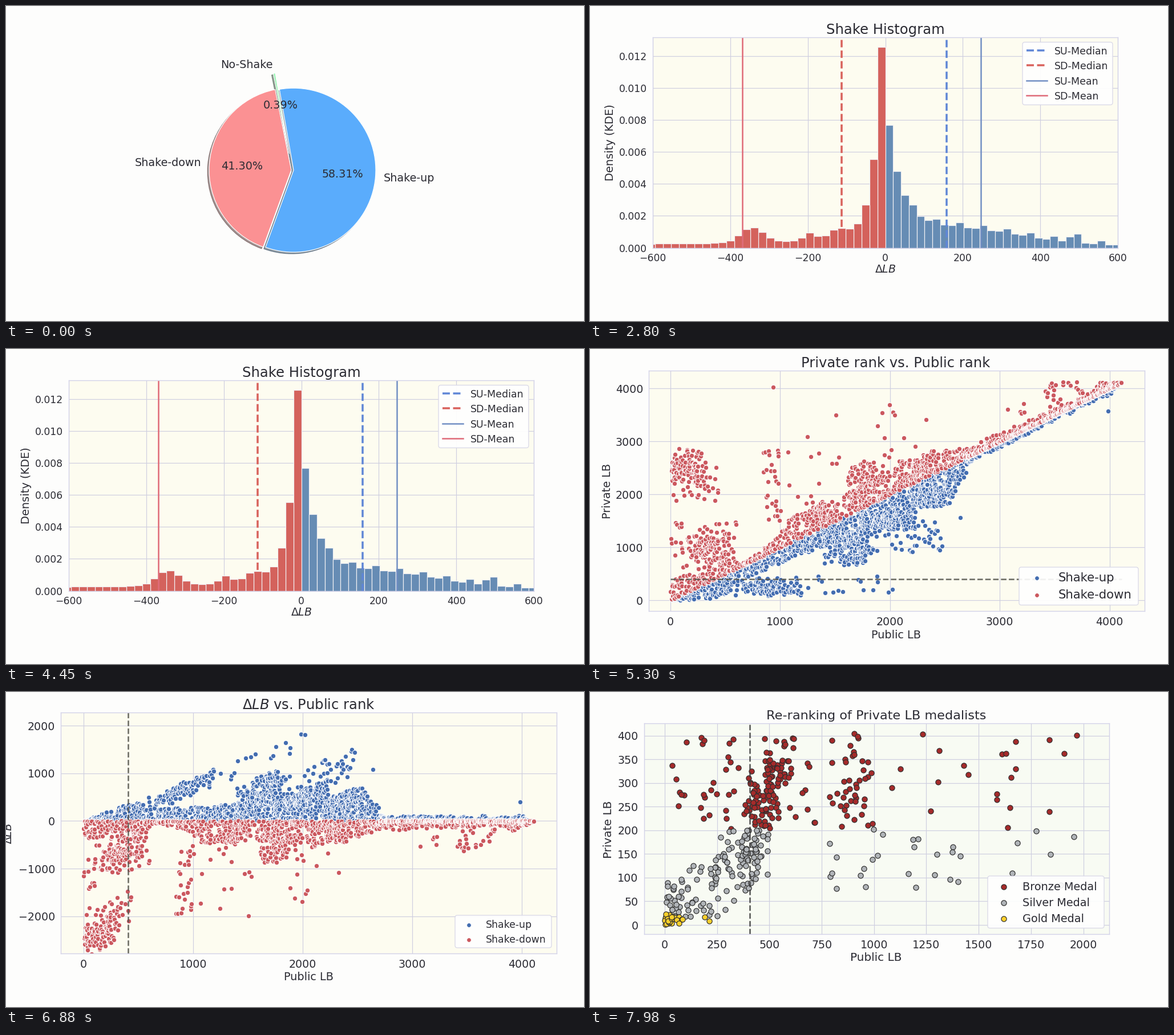
Animation, 1013 px wide and 553 px high, one loop 8 s. Source, as a matplotlib script:

```python
import numpy as np
import matplotlib.pyplot as plt
from matplotlib.animation import FuncAnimation
from matplotlib.patches import FancyBboxPatch, Rectangle

W, H, DPI = 1013, 553, 64
STEP, LOOP = 50, 8000
CUTS = [1650, 2700, 4800, 5850, 6900]   # ms at which the next chart appears

PAPER, INK = "#fdfdfc", "#2b2b33"
GRID = "#cfcfe0"
BLUE, RED = "#436db0", "#cb585e"

plt.rcParams["font.family"] = "DejaVu Sans"
plt.rcParams["text.color"] = INK
rng = np.random.default_rng(7)
fig = plt.figure(figsize=(W / DPI, H / DPI), dpi=DPI, facecolor=PAPER)


def px(n):
    """Pixels to points."""
    return n * 72 / DPI


def pane():
    """Transparent layer over the stage, in pixels from the top left."""
    ax = fig.add_axes([0, 0, 1, 1], zorder=5)
    ax.set(xlim=(0, W), ylim=(H, 0))
    ax.axis("off")
    return ax


def chart(box, xlim, ylim, xticks, yticks, size=19, face="#fdfcf0",
          edge="#d3d2e8", fmt="{:.0f}"):
    x0, y0, x1, y1 = box
    ax = fig.add_axes([x0 / W, 1 - y1 / H, (x1 - x0) / W, (y1 - y0) / H],
                      facecolor=face)
    ax.set(xlim=xlim, ylim=ylim)
    minus = lambda s: s.replace("-", "\u2212")
    ax.set_xticks(xticks, [minus(f"{v:.0f}") for v in xticks])
    ax.set_yticks(yticks, [minus(fmt.format(v)) for v in yticks])
    ax.tick_params(length=0, pad=px(10), labelsize=px(size), labelcolor=INK)
    ax.grid(color=GRID, lw=px(1.2))
    ax.set_axisbelow(True)
    for spine in ax.spines.values():
        spine.set(color=edge, lw=px(1.4))
    return ax


def words(ax, title, xlabel, ylabel):
    """Each argument is (text, x, y, size)."""
    for (s, x, y, size), rot, va in ((title, 0, "baseline"),
                                     (xlabel, 0, "center"),
                                     (ylabel, 90, "center")):
        ax.text(x, y, s, fontsize=px(size), rotation=rot, ha="center", va=va)


def legend_box(ax, x0, y0, x1, y1):
    ax.add_patch(FancyBboxPatch(
        (x0 + 4, y0 + 4), x1 - x0 - 8, y1 - y0 - 8,
        boxstyle="round,pad=4", fc="white", ec="#d6d5e6", alpha=0.9,
        lw=px(1.3)))


def entry(ax, x, y, label, size):
    ax.text(x, y, label, fontsize=px(size), va="center_baseline")


def dots(ax, pts, color, size=8.4, edge="white", ew=1.0):
    x, y = np.asarray(pts).T
    ax.plot(x, y, "o", ms=px(size), mfc=color, mec=edge, mew=px(ew))


def pie_scene():
    ax = pane()
    ax.pie([58.31, 0.39, 41.30], labels=["Shake-up", "No-Shake", "Shake-down"],
           explode=(2, 29, 2), startangle=-110, radius=144,
           colors=["#5aacfc", "#98f4b2", "#fb9193"], autopct="%.2f%%",
           shadow={"ox": -3.2, "oy": -3.2},
           wedgeprops={"edgecolor": "white", "linewidth": px(1.2)},
           textprops={"fontsize": px(19.1), "color": INK})
    ax.set(xlim=(-502, W - 502), ylim=(288 - H, 288))
    return [ax]


def count_scene():
    ax = chart((115, 94, 930, 410.5), (-500, 500), (0, 1431),
               range(-400, 401, 200), range(0, 1401, 200), 17.3,
               face="#fdfbdc", edge=INK)
    bins = [61, 151, 111, 120, 256, 1359, 441, 337, 269, 156, 124]
    ax.bar(-536.5 + 98.4 * np.arange(11), bins, 98.4, align="edge",
           color="#6db580", ec="#ebeaf0", lw=px(2.6))
    ax.axvline(-8.6, color="#1c1c1c", ls="--", lw=px(3.6))
    ax.axvline(20.5, color="#1c1c1c", lw=px(2.6))
    top = pane()
    words(top, ("Shake Histogram ( bin-width = 81 places )", 521.5, 87, 19),
          (r"$\Delta LB$", 522, 449.5, 19), ("Frequency", 47, 254, 19))
    legend_box(top, 793, 102, 921, 187)
    top.plot([800, 836], [117, 117], "--", color="#1c1c1c", lw=px(3.6))
    top.plot([800, 836], [143, 143], color="#1c1c1c", lw=px(2.6))
    top.add_patch(Rectangle((801, 163), 33, 12, fc="#6db580", ec="#ebeaf0",
                            lw=px(2)))
    for y, s in ((117, "Mean"), (143, "Median"), (169, "Shake")):
        entry(top, 849, y, s, 17.3)
    return [ax, top]


def density_scene():
    ax = chart((110, 55, 925, 424.5), (-600, 600), (0, 0.01317),
               range(-600, 601, 200), np.arange(0, 0.0121, 0.002), 17.3,
               fmt="{:.3f}")
    # Sharp peak at zero with a lumpy tail on each side, in units of 1e-5
    k = np.arange(30)
    bump = lambda at, width: np.exp(-((k - at) / width) ** 2)
    down = (1165 * np.exp(-k / 1.1) + 70 * np.exp(-k / 9) + 22
            + 95 * bump(16.3, 2) + 45 * bump(9, 1) + 55 * bump(5.5, 1.5))
    up = 600 * np.exp(-k / 1.7) + 20 + 135 / (1 + np.exp((k - 17) / 4))
    up += 16 * np.cos(2.1 * k) + 40 * bump(23.5, 1)
    for heights, w, color in ((down, -20.5, "#d4625c"), (up, 20.25, "#668cb4")):
        ax.bar(w * k, heights * 1e-5, w, align="edge", color=color,
               ec="#f2f1f4", lw=px(1.2))
    lines = [(159, "SU-Median", "#5f86d6", "--", 3.5),
             (-112.5, "SD-Median", "#d9625c", "--", 3.5),
             (246, "SU-Mean", "#728fc4", "-", 2.5),
             (-369, "SD-Mean", "#df6a78", "-", 2.5)]
    top = pane()
    words(top, ("Shake Histogram", 517.5, 48.5, 24.2),
          (r"$\Delta LB$", 517.5, 463, 19), ("Density (KDE)", 36, 240, 19.4))
    legend_box(top, 758, 63.5, 916, 173.5)
    for i, (x, label, color, ls, lw) in enumerate(lines):
        y = 78 + 26.3 * i
        ax.axvline(x, color=color, ls=ls, lw=px(lw))
        top.plot([765, 801], [y, y], color=color, ls=ls, lw=px(lw))
        entry(top, 814, y, label, 17.4)
    return [ax, top]


def patch(n, x0, x1, y0, y1, tight=1.7):
    """n points scattered over a box, denser in its middle."""
    u = rng.beta(tight, tight, (n, 2))
    return np.array([x0, y0]) + u * [x1 - x0, y1 - y0]


def fan(n, side, skew, keys):
    """Points off the diagonal, within a reach given by (x, reach) keys."""
    kx, reach = np.transpose(keys)
    x = rng.uniform(kx[0], kx[-1], n)
    return np.c_[x, x + side * np.interp(x, kx, reach) * rng.random(n) ** skew]


def tail(n, x0, x1, y0, y1):
    """Points that thin out to the right."""
    u, v = rng.random((2, n))
    return np.c_[x0 + (x1 - x0) * u ** 1.9, y0 + (y1 - y0) * v]


def rank_data():
    up = np.vstack([
        fan(820, -1, 1.3, [(0, 10), (450, 400), (750, 260), (1350, 350),
                           (1800, 600), (2650, 520), (2750, 60)]),
        fan(420, -1, 4, [(2700, 110), (4050, 110)]),
        patch(110, 560, 1250, 70, 450), patch(14, 1250, 2010, 140, 460, 1),
        patch(190, 1380, 1830, 640, 1400), patch(150, 1700, 2230, 1320, 1730),
        patch(130, 2180, 2600, 1750, 2330), patch(60, 1700, 2480, 880, 1500, 1),
        [(1985, 160), (2020, 205), (2640, 1560), (3985, 3580)]])
    down = np.vstack([
        fan(560, 1, 1.7, [(0, 350), (400, 400), (700, 60), (850, 150),
                          (1050, 520), (1500, 420), (2350, 480), (2750, 130)]),
        fan(520, 1, 5, [(2700, 200), (4110, 90)]),
        patch(85, -10, 330, 2200, 2880), patch(45, 0, 450, 1840, 2560, 1),
        patch(115, 100, 580, 560, 1300), patch(45, 0, 600, 850, 1480, 1),
        patch(28, 830, 1010, 1450, 2880, 1), patch(60, 1200, 1550, 1400, 1900),
        patch(110, 1580, 1960, 1750, 2650), patch(110, 2050, 2450, 2100, 2700),
        patch(30, 1000, 2400, 1900, 2950, 1), patch(9, 1200, 2500, 3000, 3560, 1),
        patch(5, 3060, 3260, 3500, 3870, 1), patch(30, 3400, 3800, 3600, 4140, 1),
        patch(20, 3870, 4050, 3980, 4130), [(937, 4030), (1995, 3695)]])
    up = up[(up[:, 1] < up[:, 0]) & (up[:, 1] > 5)]
    down = down[(down[:, 1] > down[:, 0]) & (down[:, 0] > 0)
                & (down[:, 1] < 4135)]
    # In rank order, so close neighbours show mostly their white rims
    return [p[p[:, 0].argsort()] for p in (up, down)]


def shake_legend(ax, box, mx, tx, rows, size):
    legend_box(ax, *box)
    for y, label, color in zip(rows, ("Shake-up", "Shake-down"), (BLUE, RED)):
        dots(ax, [(mx, y + 1)], color, 7.8)
        entry(ax, tx, y, label, size)


def rank_scene(up, down):
    ax = chart((103, 37.5, 972, 460), (-197.5, 4319.6), (-199, 4344),
               range(0, 4001, 1000), range(0, 4001, 1000))
    dots(ax, up, BLUE)
    dots(ax, down, RED)
    ax.plot([0, 4110], [403, 403], "--", color="#55554e", alpha=0.85,
            lw=px(2.6))
    top = pane()
    words(top, ("Private rank vs. Public rank", 536, 32, 24.3),
          ("Public LB", 536.5, 502, 19.3), ("Private LB", 30.5, 249, 19.3))
    shake_legend(top, (752, 383, 961, 449.5), 783, 821, (400.5, 430.5), 21.2)
    return [ax, top]


def delta_scene(up, down):
    ax = chart((96, 36, 965, 458.5), (-205.6, 4317.5), (-2778, 2281),
               range(0, 4001, 1000), range(-2000, 2001, 1000))
    for pts, color in ((up, BLUE), (down, RED)):
        dots(ax, np.c_[pts[:, 0], pts[:, 0] - pts[:, 1]], color)
    ax.axvline(406, ls="--", color="#55554e", alpha=0.85, lw=px(2.6))
    top = pane()
    words(top, (r"$\Delta LB$ vs. Public rank", 530.5, 30, 24.3),
          ("Public LB", 530.5, 500, 19.3), (r"$\Delta LB$", 5, 248, 19))
    shake_legend(top, (787, 392, 956, 449), 811, 841, (407.5, 433.5), 17.2)
    return [ax, top]


def medal_scene():
    ax = chart((94.5, 55, 910, 424.5), (-99.5, 2124), (-18.6, 425.9),
               range(0, 2001, 250), range(0, 401, 50), face="#f8fbf3")
    bronze = np.vstack([
        patch(60, 370, 560, 203, 310), patch(45, 455, 590, 285, 408),
        patch(34, 20, 430, 203, 400, 1), patch(35, 800, 1010, 203, 408, 1),
        tail(45, 590, 2010, 205, 407)])
    x = rng.uniform(5, 500, 125)
    y = np.clip(29 + 0.27 * x + rng.normal(0, 40, 125), 18, 200)
    silver = np.vstack([np.c_[x, y], patch(20, 340, 470, 120, 203),
                        tail(31, 780, 2030, 70, 203)])
    gold = np.vstack([patch(16, 0, 40, 0, 23, 1), patch(9, 30, 95, 3, 20, 1),
                      [(190, 17), (212, 9)]])
    rows = [("Bronze Medal", bronze, "#a52a2a", 340.5),
            ("Silver Medal", silver, "#b0b4b8", 369),
            ("Gold Medal", gold, "#fbd02c", 397)]
    top = pane()
    legend_box(top, 697, 323, 901, 414.5)
    for label, pts, color, y in rows:
        dots(ax, pts, color, 9.2, "#2e2e2e", 1.2)
        dots(top, [(725, y + 1)], color, 9.2, "#2e2e2e", 1.2)
        entry(top, 758, y, label, 19.3)
    ax.axvline(405, ls="--", color="#3c3c3c", alpha=0.85, lw=px(2.6))
    words(top, ("Re-ranking of Private LB medalists", 502, 48.5, 22.4),
          ("Public LB", 501.5, 466, 20), ("Private LB", 33, 241, 20))
    return [ax, top]


up, down = rank_data()
scenes = [pie_scene(), count_scene(), density_scene(), rank_scene(up, down),
          delta_scene(up, down), medal_scene()]


def show(i):
    now = sum(i * STEP >= cut for cut in CUTS)
    for k, axes in enumerate(scenes):
        for ax in axes:
            ax.set_visible(k == now)
    return []


anim = FuncAnimation(fig, show, frames=LOOP // STEP, interval=STEP,
                     init_func=lambda: show(0), repeat=True, repeat_delay=0)
plt.show()
```
